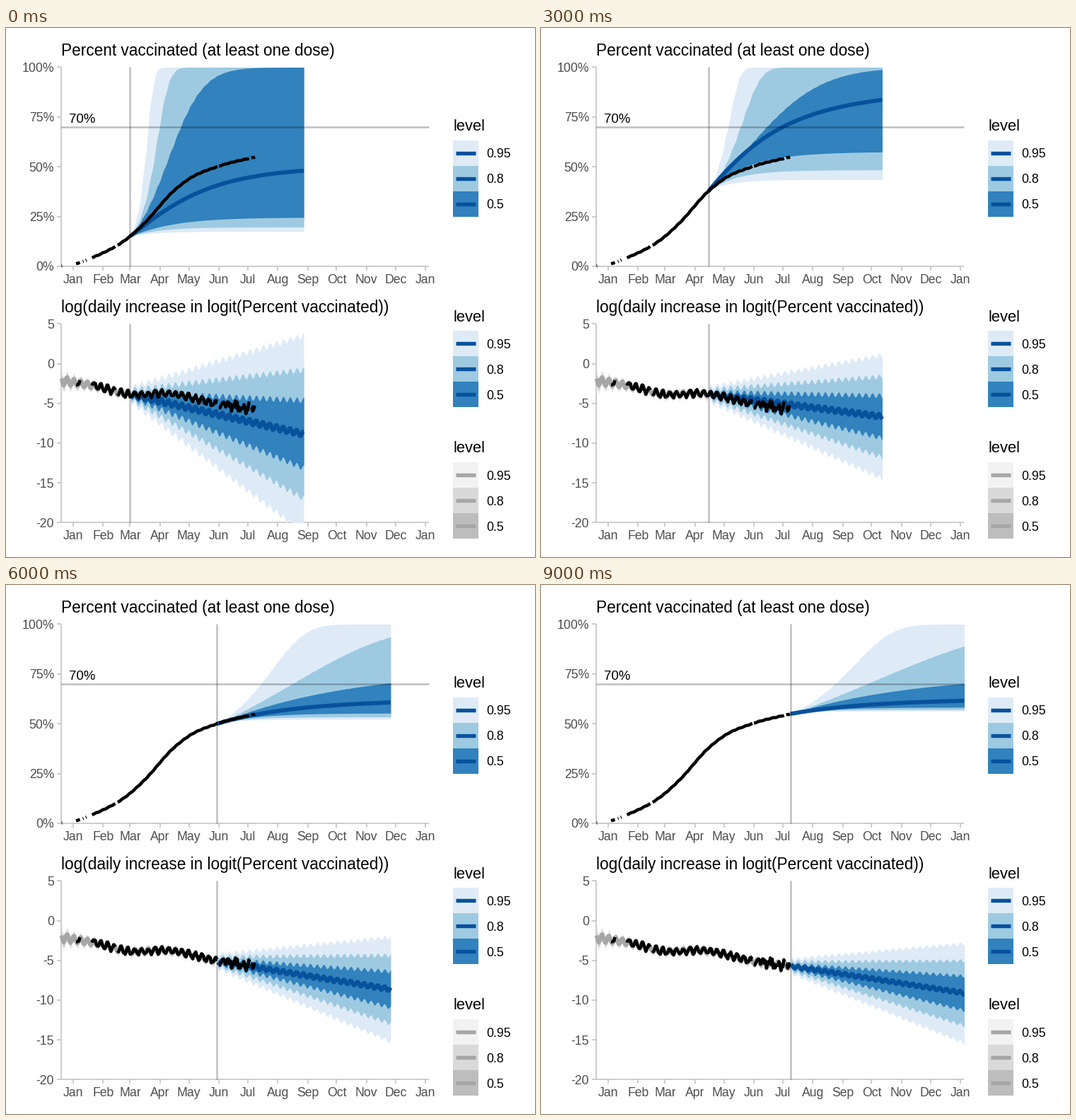
Write a matplotlib script that moves like this. It is 748x748 px and loops after 10 s.

```python
import numpy as np
import matplotlib.pyplot as plt
from matplotlib.animation import FuncAnimation
from matplotlib.patches import Rectangle

SIZE, DPI = 748, 88
PT = 72 / DPI
LEFT, RIGHT = 78, 598
HORIZON = 180
MONTHS = "Jan Feb Mar Apr May Jun Jul Aug Sep Oct Nov Dec Jan".split()
STARTS = np.arange("2021-01", "2022-02", dtype="M8[M]").astype("M8[D]")
BLUES = ["#deebf7", "#9ecae1", "#3182bd"]
GREYS = ["#f2f2f2", "#d9d9d9", "#bdbdbd"]
NAVY, GREY, AXIS, LABEL = "#08519c", "#a6a6a6", "#bebebe", "#4d4d4d"
Z = [1.96, 1.28, .674]  # normal quantiles of the three levels

plt.rcParams["font.family"] = "Liberation Sans"
fig = plt.figure(figsize=(SIZE / DPI, SIZE / DPI), dpi=DPI, facecolor="white")
ax = fig.add_axes([0, 0, 1, 1])
# whole numbers are pixel centres
ax.set(xlim=(-.5, SIZE - .5), ylim=(SIZE - .5, -.5))
ax.axis("off")


def day_x(d):
    return 94.5 + 1.3644 * np.asarray(d, float)


def pct_y(p):
    return 336.5 - 281.5 * np.asarray(p, float)


def log_y(v):
    return 474.2 - 11.24 * np.asarray(v, float)


def logit(p):
    return np.log(p / (1 - p))


def smooth(x, points):
    """Cubic curve through a few (x, y) points."""
    px, py = np.array(points, float).T
    slope = np.gradient(py, px)
    n = np.clip(np.searchsorted(px, x) - 1, 0, len(px) - 2)
    h = px[n + 1] - px[n]
    u = (x - px[n]) / h
    return (py[n] * (1 + 2 * u) * (1 - u) ** 2 + h * slope[n] * u * (1 - u) ** 2
            + py[n + 1] * u * u * (3 - 2 * u) - h * slope[n + 1] * u * u * (1 - u))


def text(x, y, s, size, color="black", ha="left"):
    ax.text(x, y, s, fontsize=size * PT, color=color, ha=ha, va="baseline")


def line(x, y, width, color, z, **kw):
    return ax.plot(x, y, lw=width * PT, color=color, zorder=z,
                   solid_capstyle="butt", solid_joinstyle="round", **kw)[0]


def guide(x, y):
    return line(x, y, 2.5, "black", 4, alpha=.25)


def ribbon(x, top, bottom, color, z):
    return ax.fill_between(x, top, bottom, color=color, lw=0, zorder=z)


# Observations: share of people and daily increase, both with a weekly cycle
RUNS = [(-12, -11.4), (3, 7), (10, 10.7), (13, 13.8), (19.5, 43.5),
        (46, 149.5), (151, 182.3), (184.5, 188.5)]
DAYS = np.arange(-12, 190)


def week(d):
    return 2 * np.pi * (np.asarray(d, float) - 0.7) / 7


def share(d):
    return smooth(d, [(-12, .002), (3, .013), (19, .042), (59, .151), (74, .218),
                      (104, .378), (120, .439), (149, .5), (189, .55)])


def trend(d):
    return smooth(d, [(-12, -2.1), (30, -3), (52, -3.75), (100, -3.75),
                      (150, -5.1), (189, -5.7)])


rng = np.random.default_rng(4)
FIT = trend(DAYS) + (.36 + .25 * np.exp(-(DAYS + 12) / 15)) * np.cos(week(DAYS))
NOISY = FIT + rng.uniform(-1, 1, DAYS.size) * np.where(DAYS < 150, .2, .5)


# Forecasts: every list of curves runs from the top limit to the bottom one
def early(i):
    """1 while forecasts are steep, 0 once growth has slowed."""
    return 1 / (1 + np.exp(2 * (i - 4.3)))


def drop(i):
    return smooth(i, [(0, 5), (1.5, 3.5), (3, 2.85), (5, 3.9), (7, 3.1), (9, 3.4)])


def pct_curves(i, start, t):
    base, e = logit(share(start)), early(i)
    pace = t + .3 * (np.sin(week(start + t)) - np.sin(week(start)))

    def curve(goal, when, k, time=t):
        gain = goal * np.expm1(-k * time) / np.expm1(-k * when)
        return pct_y(1 / (1 + np.exp(-np.minimum(base + gain, 30))))

    # upper limits: days until 70 % and bend, as (late, early) pairs
    upper = [((46, 18.5), (-.019, -.064)), ((79, 30), (-.0045, -.035)),
             ((174, 52), (.0065, -.004))]
    curves = []
    for days, bend in upper:
        when, k = (a + (b - a) * e for a, b in (days, bend))
        curves.append(curve(logit(.7) - base, when, k, pace))

    total = np.interp(i, [0, 1, 3, 5, 9], [1.65, 1.95, 2.13, .49, .27])
    curves.append(curve(total, HORIZON, .0033 * drop(i)))
    for z in Z[::-1]:
        shrink = np.exp(-(.94 + .41 * e) * z ** .75)
        curves.append(curve(total * shrink, HORIZON, .014 + .017 * z))
    return curves


def log_curves(i, start, t):
    mid = trend(start) - drop(i) * t / HORIZON
    mid = mid + (.36 - .017 * i) * np.cos(week(start + t))
    sd = .45 + (2.7 + 3.2 * np.exp(-i / 2.2)) * t / HORIZON
    return [np.clip(log_y(mid + z * sd), 418, 699)
            for z in Z + [0] + [-z for z in Z[::-1]]]


def panel(title, title_y, top, bottom, ticks):
    text(LEFT, title_y, title, 22.6)
    line([LEFT, LEFT], [top, bottom], 1.5, AXIS, 1)
    line([LEFT, RIGHT], [bottom, bottom], 1.5, AXIS, 1)
    for y, label in ticks:
        line([72, LEFT], [y, y], 1.5, AXIS, 1)
        text(67.5, y + 6.3, label, 17.6, LABEL, "right")
    for x, name in zip(day_x((STARTS - STARTS[0]).astype(int)), MONTHS):
        line([x, x], [bottom, bottom + 6], 1.5, AXIS, 1)
        text(x, bottom + 23.7, name, 17.6, LABEL, "center")


def legend(title_y, top, fills, stroke):
    text(632, title_y, "level", 22)
    for n, (fill, label) in enumerate(zip(fills, ["0.95", "0.8", "0.5"])):
        y = top + 36 * n
        ax.add_patch(Rectangle((631.5, y), 36, 36, fc=fill, lw=0))
        line([635.5, 664], [y + 18, y + 18], 5.4, stroke, 3)
        text(679, y + 24.3, label, 17.6)


panel("Percent vaccinated (at least one dose)", 39, 55, 336.5,
      [(pct_y(p / 100), f"{p}%") for p in range(0, 101, 25)])
panel("log(daily increase in logit(Percent vaccinated))", 402, 418, 699,
      [(log_y(v), str(v)) for v in range(-20, 6, 5)])
legend(144.5, 158.5, BLUES, NAVY)
legend(415, 428, BLUES, NAVY)
legend(600, 614, GREYS, GREY)
text(89, 133.5, "70%", 18.6)
guide([LEFT, RIGHT], [pct_y(.7)] * 2)

for a, b in RUNS:
    d = np.unique(np.r_[a, np.arange(np.ceil(a), b), b])
    wiggle = .0012 * np.sin(week(d)) * (d > 20)
    line(day_x(d), pct_y(share(d) + wiggle), 4.5, "black", 5)
    if b - a > 2:
        line(day_x(d), log_y(np.interp(d, DAYS, NOISY)), 4.5, "black", 5)

moving = []


def draw(i):
    while moving:
        moving.pop().remove()
    start = min(59 + 15 * i, 189)
    t = np.arange(HORIZON + 1)
    x = day_x(start + t)
    for make, first in ((pct_curves, 0), (log_curves, 1)):
        curves = [c[first:] for c in make(i, start, t)]
        for n, color in enumerate(BLUES):
            moving.append(ribbon(x[first:], curves[n], curves[6 - n], color, 2))
        moving.append(line(x[first:], curves[3], 5.8, NAVY, 3))

    past = DAYS <= start
    d, fit = DAYS[past], FIT[past]
    wide = .28 * (1 + 1.2 * np.exp(-(d + 12) / 12))
    for z, color in zip(Z, GREYS):
        moving.append(ribbon(day_x(d), log_y(fit + z * wide),
                             log_y(fit - z * wide), color, 1.5))
    moving.append(line(day_x(d), log_y(fit), 5.8, GREY, 1.8))
    for span in ((55, 336.5), (418, 699)):
        moving.append(guide([x[0], x[0]], span))
    return moving


anim = FuncAnimation(fig, draw, frames=10, interval=1000, repeat=True,
                     repeat_delay=0, init_func=lambda: draw(0), blit=False)
plt.show()
```
